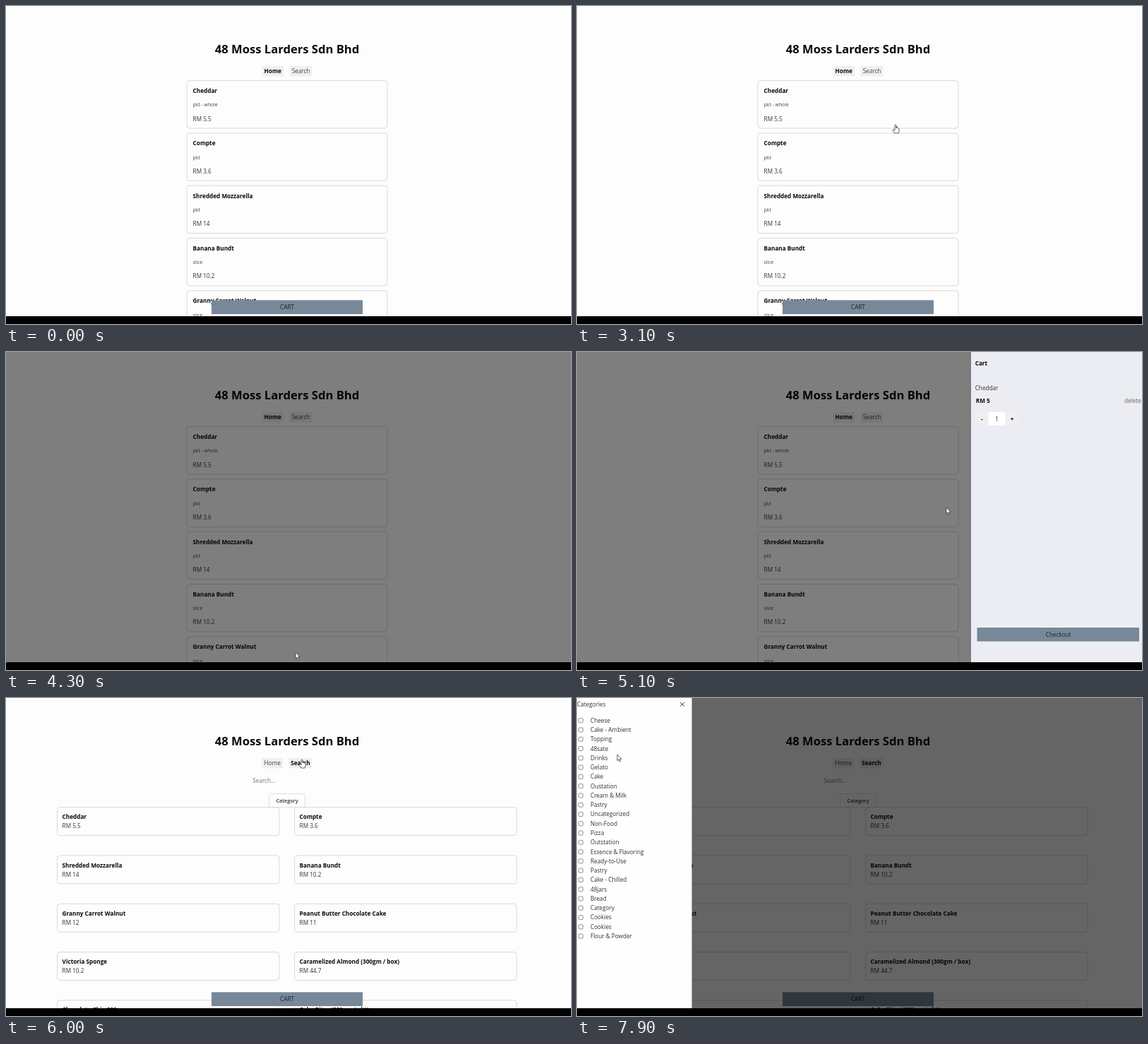
Recreate the animation shown at these times as an HTML page with a canvas. Size 800 px wide and 450 px high, loop 8 s.

```html
<!DOCTYPE html>
<html lang="en">
<head>
<meta charset="utf-8">
<title>Shop walkthrough</title>
<style>
  html, body { margin: 0; width: 100%; height: 100%; overflow: hidden; background: #fdfdfd; }
  canvas { display: block; width: 800px; height: 450px; }
</style>
</head>
<body>
<canvas id="stage"></canvas>
<script>
const LOOP = 8000;
const W = 800, H = 450, FLOOR = 439;
const SLATE = '#778899';
const SHOP = '48 Moss Larders Sdn Bhd';

const products = [
  ['Cheddar', 'RM 5.5', 'pkt - whole'],
  ['Compte', 'RM 3.6', 'pkt'],
  ['Shredded Mozzarella', 'RM 14', 'pkt'],
  ['Banana Bundt', 'RM 10.2', 'slice'],
  ['Granny Carrot Walnut', 'RM 12', 'slice'],
  ['Peanut Butter Chocolate Cake', 'RM 11'],
  ['Victoria Sponge', 'RM 10.2'],
  ['Caramelized Almond (300gm / box)', 'RM 44.7'],
  ['Chocolate Chip 300g', 'RM 18'],
  ['Cake Bites (300gm / pkt)', 'RM 20']
];

const categories = [
  'Cheese', 'Cake - Ambient', 'Topping', '48sate', 'Drinks', 'Gelato', 'Cake', 'Oustation',
  'Cream & Milk', 'Pastry', 'Uncategorized', 'Non-Food', 'Pizza', 'Outstation',
  'Essence & Flavoring', 'Ready-to-Use', 'Pastry', 'Cake - Chilled', '48jars', 'Bread',
  'Category', 'Cookies', 'Cookies', 'Flour & Powder'
];

// Pointer path: time, x, y of the tip
const path = [
  [0, 812, 300], [100, 806, 295], [900, 503, 122], [1700, 503, 122], [2100, 341, 148],
  [2500, 458, 155], [2600, 454, 166], [3000, 454, 166], [3100, 451, 168], [3650, 451, 168],
  [4000, 410, 425], [4650, 410, 425], [5050, 523, 220], [5450, 523, 220], [5800, 419, 87],
  [6250, 419, 87], [6700, 399, 141], [7150, 399, 141], [7850, 57, 80], [8000, 57, 80]
];

const canvas = document.getElementById('stage');
const ctx = canvas.getContext('2d');
const dpr = window.devicePixelRatio || 1;
canvas.width = W * dpr;
canvas.height = H * dpr;

const clamp = v => Math.min(1, Math.max(0, v));
const ramp = (t, from, to) => clamp((t - from) / (to - from));
const smooth = p => p * p * (3 - 2 * p);
const easeOut = p => Math.sin(p * Math.PI / 2);

function text(str, x, midY, { size = 8.2, weight = 400, color = '#333', align = 'left' } = {}) {
  ctx.font = `${weight} ${size}px "Open Sans", "Noto Sans", sans-serif`;
  ctx.textAlign = align;
  ctx.fillStyle = color;
  ctx.fillText(str, x, midY + size * 0.36);
}

const bold = { weight: 700, color: '#0a0a0a' };

function rect(x, y, w, h, color) {
  ctx.fillStyle = color;
  ctx.fillRect(x, y, w, h);
}

function outline(x, y, w, h, radius, color, width = 0.8) {
  ctx.beginPath();
  ctx.roundRect(x, y, w, h, radius);
  ctx.strokeStyle = color;
  ctx.lineWidth = width;
  ctx.stroke();
}

function header(onSearch) {
  text(SHOP, 398, 61.3, { ...bold, size: 16.6, align: 'center' });
  const tab = (label, x, w, active) => {
    rect(x, 85, w, 14.5, '#efefef');
    text(label, x + w / 2, 92.2, { ...(active ? bold : { color: '#444' }), align: 'center' });
  };
  tab('Home', 362.3, onSearch ? 29.7 : 30.7, !onSearch);
  tab('Search', onSearch ? 400.5 : 401.7, onSearch ? 32.7 : 31.6, onSearch);
}

function homePage() {
  header(false);
  products.slice(0, 5).forEach(([name, price, unit], i) => {
    const y = 105.6 + i * 74.3;
    outline(256, y, 284, 67.4, 4, '#d0d0d0');
    text(name, 264.6, y + 14.5, bold);
    text(unit, 264.6, y + 34.3, { size: 6.85, color: '#444' });
    text(price, 264.6, y + 54);
  });
}

function searchPage() {
  header(true);
  text('Search...', 349.3, 117.4, { color: '#757575' });
  outline(372.5, 135.5, 51, 19, 2, '#d8d8d8');
  text('Category', 398, 145, { size: 7.2, weight: 600, align: 'center' });
  products.forEach(([name, price], i) => {
    const x = 72.6 + (i % 2) * 336;
    const y = 154.6 + (i >> 1) * 68.3;
    outline(x, y, 314.4, 40, 4, '#d0d0d0');
    text(name, x + 7, y + 13.7, bold);
    text(price, x + 7, y + 26.9);
  });
}

function cartButton() {
  rect(291, 416.3, 214, 19.7, SLATE);
  text('CART', 398, 426.2, { color: '#1c2127', align: 'center' });
}

function shade(alpha) {
  rect(0, 0, W, FLOOR, `rgba(0,0,0,${alpha})`);
}

function cartDrawer(open) {
  ctx.save();
  ctx.translate(242 * (1 - open), 0);
  rect(558, 0, 242, FLOOR, '#ecedf2');
  text('Cart', 563.7, 16.3, bold);
  text('Cheddar', 563.7, 51.4);
  text('RM 5', 564.8, 69, bold);
  text('delete', 798.8, 69, { color: '#666', align: 'right' });
  rect(564.5, 85, 18, 19, '#efefef');
  rect(582.5, 85, 24, 19, '#fff');
  rect(606.5, 85, 19, 19, '#efefef');
  const mid = { align: 'center' };
  text('-', 573.3, 94.6, { ...bold, ...mid });
  text('1', 594.6, 94.6, mid);
  text('+', 616, 94.6, { ...bold, ...mid });
  rect(566.5, 390, 229.5, 19.5, SLATE);
  text('Checkout', 681.5, 399.8, { color: '#1c2127', ...mid });
  ctx.restore();
}

function categoryDrawer(open) {
  const w = 162.6;
  ctx.save();
  ctx.globalAlpha = open;
  ctx.translate(-w * (1 - open), 0);
  rect(0, 0, w, FLOOR, '#fefefe');
  text('Categories', 0, 9.3);
  ctx.beginPath();
  for (const s of [1, -1]) {
    ctx.moveTo(149 - 3, 9 - 3 * s);
    ctx.lineTo(149 + 3, 9 + 3 * s);
  }
  ctx.strokeStyle = '#333';
  ctx.lineWidth = 0.9;
  ctx.stroke();
  categories.forEach((name, i) => {
    const y = 31.8 + i * 13.27;
    outline(2.4, y - 3, 6, 6, 1.2, '#777');
    text(name, 19, y);
  });
  ctx.restore();
}

function pointerAt(t) {
  let i = 1;
  while (i < path.length - 1 && t > path[i][0]) i++;
  const [t0, x0, y0] = path[i - 1];
  const [t1, x1, y1] = path[i];
  const p = smooth(ramp(t, t0, t1));
  return [x0 + (x1 - x0) * p, y0 + (y1 - y0) * p];
}

function isClickable(x, y, onSearch) {
  const inside = (l, top, r, b) => x > l && x < r && y > top && y < b;
  if (inside(362, 85, 433, 100)) return true;
  return onSearch ? inside(372, 135, 424, 155) : inside(256, 105, 540, FLOOR);
}

const arrow = new Path2D('M0 0V8.6L1.9 6.9L3.2 10L4.7 9.4L3.4 6.4H6Z');
const hand = new Path2D('M-1 .8Q0-.6 1 .8V4.6Q2-.2 2.6 5Q3.4 4.3 4 5.4Q5.2 5 5.2 6.4V8.6L4.2 12H-1.2L-3.7 8Q-4 6.4-2.4 6.8L-1 8Z');

function pointer(x, y, isHand) {
  const shape = isHand ? hand : arrow;
  ctx.save();
  ctx.translate(x, y);
  ctx.fillStyle = '#fff';
  ctx.fill(shape);
  ctx.strokeStyle = '#222';
  ctx.lineWidth = 0.7;
  ctx.lineJoin = 'round';
  ctx.stroke(shape);
  ctx.restore();
}

function draw(t) {
  const onSearch = t >= 5950;
  const cartActive = t >= 4080 && t < 5400;
  const closing = ramp(t, 5200, 5400);
  const cartShade = 0.5 * ramp(t, 4080, 4280) * (1 - closing);
  const cartOpen = smooth(ramp(t, 4350, 4550)) * (1 - smooth(closing));
  const menu = ramp(t, 6891, 7091);

  ctx.setTransform(dpr, 0, 0, dpr, 0, 0);
  rect(0, 0, W, H, '#fdfdfd');
  if (onSearch) searchPage(); else homePage();
  if (!cartActive) cartButton();
  if (cartActive) {
    shade(cartShade);
    if (cartOpen > 0) cartDrawer(cartOpen);
  }
  if (menu > 0) {
    shade(0.6 * easeOut(menu));
    categoryDrawer(smooth(menu));
  }
  const [x, y] = pointerAt(t);
  const covered = cartActive || menu > 0;
  pointer(x, y, !covered && isClickable(x, y, onSearch));
  rect(0, FLOOR, W, H - FLOOR, '#000');
}

const start = performance.now();
function tick() {
  draw((performance.now() - start) % LOOP);
  requestAnimationFrame(tick);
}
tick();
</script>
</body>
</html>
```
